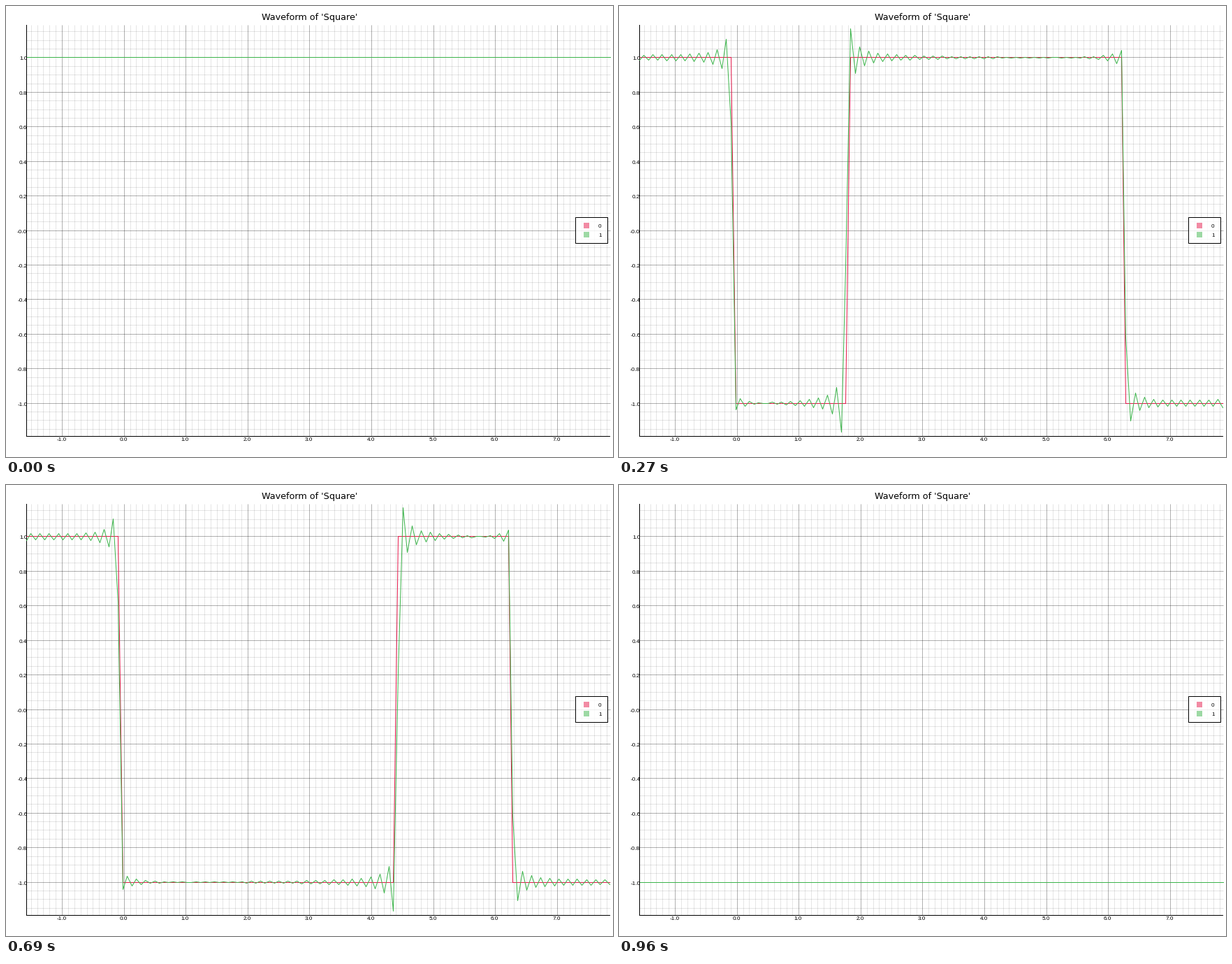
Recreate the animation shown at these times as a matplotlib script. Size 869 by 645 pixels, loop 0.99 s.

```python
import numpy as np
import matplotlib.pyplot as plt
from matplotlib.animation import FuncAnimation
from matplotlib.collections import LineCollection
from matplotlib.patches import Rectangle

W, H, DPI = 869, 645, 72
LEFT, RIGHT, TOP, BOTTOM = 29, 864, 27, 615
X0, SPAN, YMAX = -np.pi / 2, 3 * np.pi, 1.19
RED, GREEN = (230 / 255, 25 / 255, 75 / 255), (60 / 255, 180 / 255, 75 / 255)

FRAMES, STEPS, HOLD = 33, 31, 19
SAMPLES, HARMONICS = 128, 42


def px(x):
    return np.floor(LEFT + (x - X0) * (RIGHT - LEFT) / SPAN) + 0.5


def py(y):
    return np.floor((TOP + BOTTOM) / 2 - y * (BOTTOM - TOP) / (2 * YMAX)) + 0.5


fig = plt.figure(figsize=((W + 0.01) / DPI, (H + 0.01) / DPI), dpi=DPI, facecolor="white")
ax = fig.add_axes([0, 0, 1, 1])
ax.set_xlim(0, W)
ax.set_ylim(H, 0)
ax.axis("off")


def grid(xs, ys, alpha):
    segs = [[(px(x), TOP), (px(x), BOTTOM)] for x in xs]
    segs += [[(LEFT, py(y)), (RIGHT + 1, py(y))] for y in ys]
    ax.add_collection(LineCollection(segs, colors=[(0, 0, 0, alpha)],
                                     linewidths=1, zorder=1), autolim=False)


def label(x, y, text, ha="center", size=8.1, font="Liberation Sans"):
    ax.text(x, y, text, ha=ha, va="baseline", fontsize=size,
            family=font, color="black", zorder=6)


def box(x, y, w, h, zorder, **style):
    ax.add_patch(Rectangle((x, y), w, h, zorder=zorder, **style))


# Mesh, axes and labels
major_x = np.arange(-1, 8)
major_y = np.arange(-5, 6) / 5
grid(np.arange(-15, 79) / 10, np.arange(-23, 24) / 20, 0.1)
grid(major_x, major_y, 0.23)

box(LEFT, TOP, 1, BOTTOM - TOP + 1, 2, fc="black", lw=0)
box(LEFT, BOTTOM, RIGHT - LEFT + 1, 1, 2, fc="black", lw=0)
for x in major_x:
    label(px(x), 622, f"{x:.1f}")
for y in major_y:
    label(30.3, py(y) + 3, "-0.0" if y == 0 else f"{y:.1f}", ha="right")
label(434.5, 19.6, "Waveform of 'Square'", size=12.7, font="DejaVu Sans")

# Legend
box(814.5, 302.5, 46, 37, 5, fc=(1, 1, 1, 0.8), ec="black", lw=1)
for i, color in enumerate((RED, GREEN)):
    y = 310 + 13 * i
    box(826.5, y, 8.5, 8.5, 6, fc=color, alpha=0.5, lw=0)
    label(850.2, y + 7.2, str(i))

# Waveforms: plotted positions and the phases they sample
xs = px(X0 + np.linspace(0, SPAN, SAMPLES))
phase = X0 + np.arange(1, SAMPLES + 1) * SPAN / SAMPLES
n = np.arange(1, HARMONICS + 1)[:, None]

pulse_line, = ax.plot([], [], color=RED, lw=1, zorder=3)
series_line, = ax.plot([], [], color=GREEN, lw=1, zorder=4)


def pulse(duty):
    return np.where(np.mod(phase, 2 * np.pi) < 2 * np.pi * duty, -1.0, 1.0)


def fourier(duty):
    half = np.pi * duty
    terms = np.sin(n * half) * np.cos(n * (phase - half)) / n
    return 1 - 2 * duty - 4 / np.pi * terms.sum(axis=0)


def update(frame):
    step = frame if frame < HOLD else frame - 1
    duty = step / STEPS
    pulse_line.set_data(xs, py(pulse(duty)))
    series_line.set_data(xs, py(np.round(fourier(duty), 9)))
    return pulse_line, series_line


anim = FuncAnimation(fig, update, frames=FRAMES, interval=30,
                     init_func=lambda: update(0), repeat=True, repeat_delay=0)
plt.show()
```
